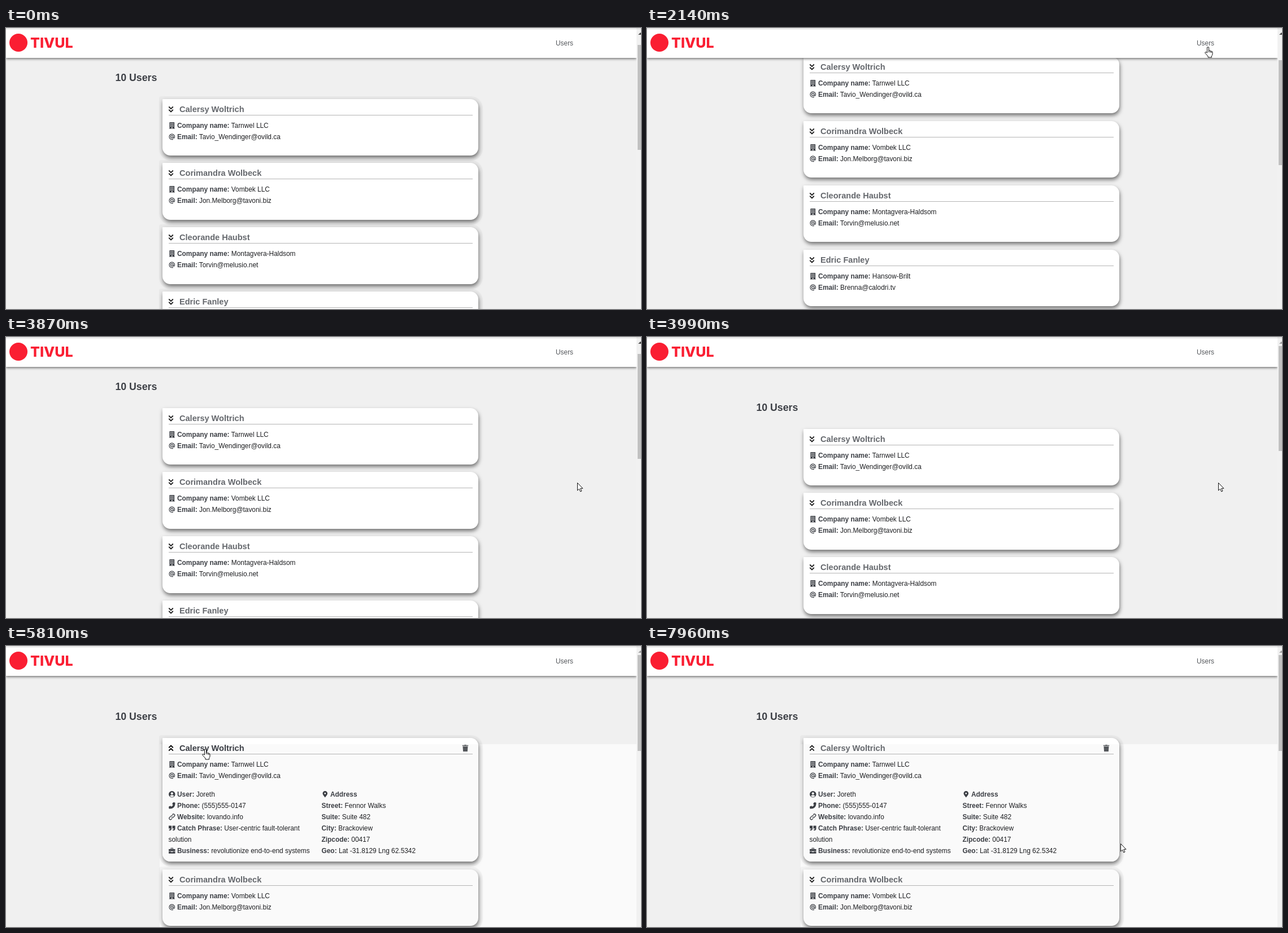
Animation, 1124 px wide and 498 px high, one loop 8 s. Source, as an HTML page:

```html
<!DOCTYPE html>
<html lang="en">
<head>
<meta charset="utf-8">
<title>Users</title>
<style>
html, body { margin: 0; width: 100%; height: 100%; overflow: hidden; }
body { position: relative; background: #f0f0f0; color: #1e1f22; font: 11.9px/20px "Liberation Sans", Arial, sans-serif; }
header, #page, #glow, #bar, #cursor, .abs { position: absolute; }
header { left: 0; top: 0; width: 1116px; height: 53px; background: #fff; box-shadow: 0 2px 4px rgba(0,0,0,.5); }
header i { left: 6px; top: 10px; width: 32px; height: 32px; border-radius: 50%; background: #fa1e32; }
header b { left: 43px; top: 11px; font: 800 25px/30px Inter, sans-serif; color: #fa1e32; }
header span { left: 973px; top: 17px; color: #55585c; }
#topline { left: 0; top: 1px; width: 100%; height: 1px; background: #ccc; }
#glow { left: 272px; top: 174px; right: 0; bottom: 0; background: #fafafa; }
#page { left: 0; top: 0; width: 1116px; height: 498px; }
h2 { position: absolute; left: 193.5px; top: 114.5px; margin: 0; font-size: 17.7px; line-height: 20px; color: #3c3f45; }
#cards { position: absolute; left: 277px; top: 162.6px; width: 559px; }
.card { position: relative; box-sizing: border-box; height: 100.4px; margin-bottom: 13.5px; padding: 8px 10.5px 0; background: #fff;
  border-radius: 1px 14px 14px 14px; box-shadow: 1px 4px 7px rgba(0,0,0,.52); }
.halo .card { box-shadow: 1px 4px 7px rgba(0,0,0,.52), 1px 2px 0 7px rgba(0,0,0,.03); }
h3 { margin: 0 0 8px; border-bottom: 1px solid #b4b4b4; height: 20px; font-size: 14.55px; line-height: 20px; color: #65686d; }
.card b { color: #3c3f45; }
svg { overflow: visible; }
.icon { width: 11.5px; height: 11.5px; margin-right: 4px; vertical-align: -1.5px; fill: #3c3f45; fill-rule: evenodd; }
.line { fill: none; stroke: #3c3f45; stroke-width: 1.8; }
h3 .icon { width: 12px; height: 12px; margin: 0 9.5px 0 -2px; vertical-align: -1px; stroke: #222; stroke-width: 2.4; }
h3 .trash { display: none; position: absolute; right: 7.5px; top: 12px; stroke: none; fill: #55585c; }
.hover h3 { color: #3a3d44; }
.hover h3 .line { stroke: #000; }
.details { display: none; margin-top: 13px; }
.details div { width: 271px; }
.open { height: 219.5px; }
.open .details { display: flex; }
.open .trash { display: inline; }
.open h3 .line { transform: scaleY(-1); }
.lit .card { background: #fafafa; }
.lit .open { background: linear-gradient(#fff 11px, #fafafa 0); }
#bar { left: 1116px; top: 2px; width: 8px; height: 496px; background: #f1f1f1; overflow: hidden; }
#thumb { left: 2px; width: 6px; background: #c1c1c1; }
#arrow { left: 3px; top: 6px; border: 4px solid transparent; border-top: 0; border-bottom-color: #505050; }
#cursor { left: 0; top: 0; width: 16px; height: 20px; fill: #fff; stroke: #111; }
</style>
</head>
<body>
<div id="glow"></div>
<div id="page"><h2>10 Users</h2><div id="cards"></div></div>
<header><i class="abs"></i><b class="abs">TIVUL</b><span class="abs">Users</span></header>
<div id="bar"><div id="arrow" class="abs"></div><div id="thumb" class="abs"></div></div>
<div id="topline" class="abs"></div>
<svg id="cursor"><path/></svg>
<script>
const $ = id => document.getElementById(id);

const shapes = {
  building: 'M2 0h12v15h1v1H1v-1h1z' + [2, 5.5, 9].map(y => `M4.5 ${y}h2.5v2H4.5zM9 ${y}h2.5v2H9z`).join('') + 'M6.8 12.5h2.4V15H6.8z',
  user: 'M8 0a8 8 0 1 0 0 16A8 8 0 0 0 8 0zM8 3a3 3 0 1 1 0 6 3 3 0 0 1 0-6zM3 12.5Q4 10 6 10h4q2 0 3 2.5-2 2.3-5 2.3T3 12.5z',
  phone: 'M15.5.8L12.2 0 10 1 8.6 4.4l2.2 2Q9.6 9.2 6.4 10.8l-2-2.2L.8 10.2 0 12l.8 3.5q.2.5.8.5Q9 16 12.5 12.5T16 1.5z',
  quote: 'M0 2h7v7q0 5-5 5H1v-2.5h1q2 0 2-2.5H0zM9 2h7v7q0 5-5 5h-1v-2.5h1q2 0 2-2.5H9z',
  work: 'M5 4V1h6v3h5v5H0V4zM6.5 2.5V4h3V2.5zM0 10h6v1.5h4V10h6v5H0z',
  pin: 'M8 0a6 6 0 0 1 6 6q0 3-6 10Q2 9 2 6a6 6 0 0 1 6-6zm0 4a2 2 0 1 0 0 4 2 2 0 0 0 0-4z',
  trash: 'M1 1h4.5l.6-1h3.8l.6 1H15v2H1zM2 4h12l-.8 12H2.8z'
};
const strokes = {
  at: 'M11 8a3 3 0 1 1-6 0 3 3 0 0 1 6 0v1.5q0 1.8 1.6 1.8 2-.4 2-3.3A6.6 6.6 0 1 0 11 14',
  link: 'M6.5 9.5a3 3 0 0 0 4.4 0l3-3a3 3 0 0 0-4.4-4.4L8.3 3.3M9.5 6.5a3 3 0 0 0-4.4 0l-3 3a3 3 0 0 0 4.4 4.4l1.2-1.2',
  chevrons: 'M3 2l5 5 5-5M3 9l5 5 5-5'
};
const pointers = {
  arrow: 'M.5.5V14l3.1-2.8L5.8 16 8 15 5.8 10.3H10z',
  hand: 'M4.5 11V2Q4.5.6 6 .6T7.5 2v5q2-1 2.5.8 2-.8 2 .8 2-.4 2 1.4v3q0 2-1.5 3.5V19H6v-2l-5-5.5q-.7-1.7 1-1.9 1 0 2.5 1.4zM7.5 7v3M10 8v2.5M12 9v2'
};

const icon = name => `<svg class="icon ${name} ${strokes[name] ? 'line' : ''}" viewBox="0 0 16 16"><path d="${shapes[name] || strokes[name]}"/></svg>`;
const row = (name, label, value = '') => `<div>${name && icon(name)}<b>${label}</b> ${value}</div>`;

const details = `<div class="details"><div>${
  row('user', 'User:', 'Joreth') + row('phone', 'Phone:', '(555)555-0147') +
  row('link', 'Website:', 'lovando.info') +
  row('quote', 'Catch Phrase:', 'User-centric fault-tolerant solution') +
  row('work', 'Business:', 'revolutionize end-to-end systems')}</div><div>${
  row('pin', 'Address') + row('', 'Street:', 'Fennor Walks') + row('', 'Suite:', 'Suite 482') +
  row('', 'City:', 'Brackoview') + row('', 'Zipcode:', '00417') +
  row('', 'Geo:', 'Lat -31.8129 Lng 62.5342')}</div></div>`;

$('cards').innerHTML = [
  ['Calersy Woltrich', 'Tarnwel LLC', 'Tavio_Wendinger@ovild.ca'],
  ['Corimandra Wolbeck', 'Vombek LLC', 'Jon.Melborg@tavoni.biz'],
  ['Cleorande Haubst', 'Montagvera-Haldsom', 'Torvin@melusio.net'],
  ['Edric Fanley', 'Hansow-Brilt', 'Brenna@calodri.tv']
].map(([name, company, email], i) => `<div class="card"><h3>${icon('chevrons')}${name}${i ? '' : icon('trash')}</h3>${
  row('building', 'Company name:', company) + row('at', 'Email:', email)}${i ? '' : details}</div>`).join('');

// Each glide bends from the previous resting point past `via` to `to`
const entry = [880, 540];
const glides = [
  { start: 500, steps: 7, via: [965, 190], to: [1001, 49] },
  { start: 1340, steps: 2, via: [989, 36], to: [987, 33] },
  { start: 2890, steps: 5, via: [1018, 130], to: [1011, 258] },
  { start: 4400, steps: 3, via: [850, 160], to: [734, 161] },
  { start: 4780, steps: 2, via: [603, 150], to: [460, 171] },
  { start: 5040, steps: 3, via: [380, 186], to: [347, 182] },
  { start: 6460, steps: 4, via: [190, 185], to: [213, 239] },
  { start: 7000, steps: 7, via: [250, 395], to: [719, 401] },
  { start: 7840, steps: 2, via: [800, 385], to: [838, 350] }
];
const tick = 120;
const within = (t, a, b) => t >= a && t < b;

function pointerAt(t) {
  const i = glides.findLastIndex(g => g.start <= t);
  if (i < 0) return null;
  const { start, steps, via, to } = glides[i];
  const from = i ? glides[i - 1].to : entry;
  const p = Math.min(1, (Math.floor((t - start) / tick) + 1) / steps), q = 1 - p;
  return from.map((v, k) => Math.round(q * q * v + 2 * q * p * via[k] + p * p * to[k]));
}

const first = document.querySelector('.card');
function draw(now) {
  const t = now % 8000;
  const scroll = t >= 3990 ? 0 : within(t, 2140, 3870) ? 111.5 : 37;
  const open = t >= 5810;
  const hover = within(t, 5040, 6460);
  const hand = hover || within(t, 1340, 2890);
  const pos = pointerAt(t);

  $('page').style.top = -scroll + 'px';
  $('page').className = open ? 'halo lit' : t < 2140 ? 'halo' : '';
  $('glow').hidden = !open;
  first.classList.toggle('open', open);
  first.classList.toggle('hover', hover);
  $('thumb').style.top = 14 + scroll * .37 + 'px';
  $('thumb').style.height = (open ? 170 : 186) + 'px';
  $('arrow').style.borderBottomColor = scroll ? '#505050' : '#a3a3a3';

  $('cursor').style.display = pos ? 'block' : 'none';
  if (pos) $('cursor').style.transform = `translate(${pos[0]}px,${pos[1]}px)`;
  $('cursor').firstChild.setAttribute('d', hand ? pointers.hand : pointers.arrow);
  requestAnimationFrame(draw);
}
draw(0);
</script>
</body>
</html>
```
